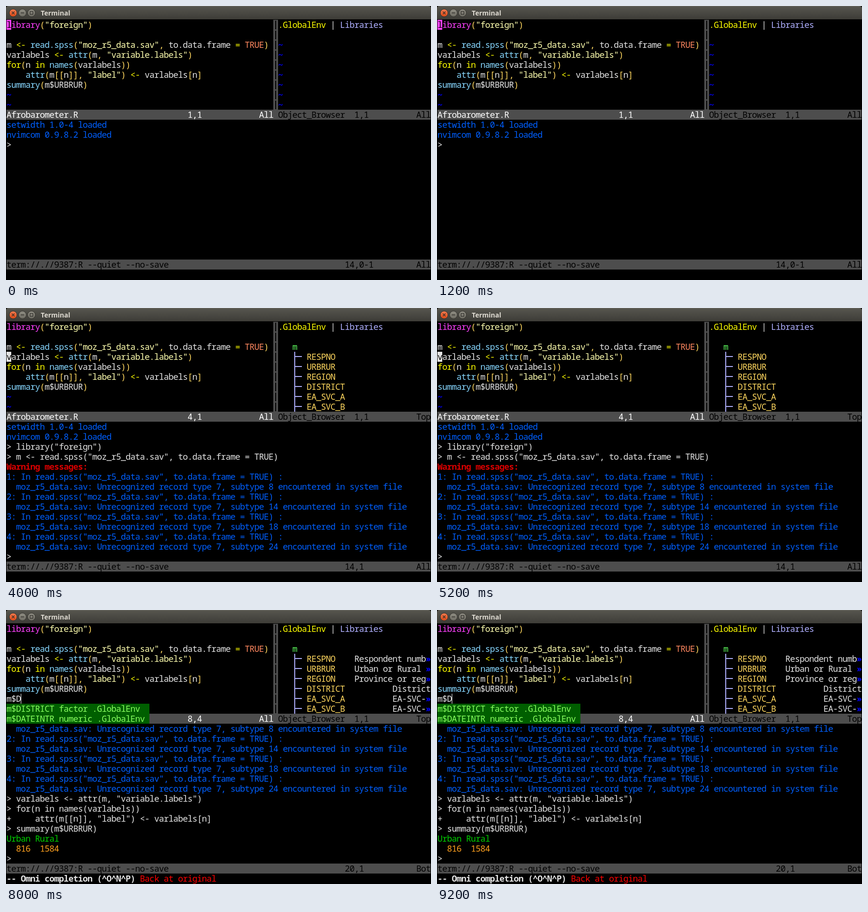
Animation of 892x576 px, one loop 10000 ms. Source, as an HTML page:

```html
<!DOCTYPE html>
<html lang="en">
<head>
<meta charset="utf-8">
<title>Terminal</title>
<style>
  html, body { margin: 0; width: 100%; height: 100%; overflow: hidden; background: #000; }
  #stage { position: absolute; left: 0; top: 0; width: 892px; height: 576px; overflow: hidden; background: #000; }
  #bar { position: absolute; left: 0; top: 0; }
  #bar text { font: bold 14px "Open Sans", "Noto Sans", sans-serif; fill: #dfdbd2; }
  #grid span, #probe {
    position: absolute; white-space: pre; height: 21px; line-height: 21px;
    font: 18px/21px "Noto Sans Mono", "DejaVu Sans Mono", monospace;
    font-variant-ligatures: none; font-kerning: none; color: #e4e4e4;
  }
  #probe { visibility: hidden; }
  #grid i { position: absolute; }
  #grid .magenta { color: #ff40ff; }
  #grid .string { color: #ffffaf; }
  #grid .gold { color: #ffd75f; }
  #grid .yellow { color: #ffff00; }
  #grid .func { color: #87d7ff; }
  #grid .const { color: #ff875f; }
  #grid .blue { color: #0000ff; }
  #grid .msg { color: #005fff; }
  #grid .warn { color: #d70000; font-weight: bold; }
  #grid .lilac { color: #afafff; }
  #grid .leaf { color: #5fff5f; }
  #grid .green { color: #00cd00; }
  #grid .orange { color: #ffa01e; }
  #grid .red { color: #ff0000; }
  #grid .bold { font-weight: bold; }
  #grid .white { color: #fff; }
  #grid .black { color: #000; }
  #grid .menu { color: #87ff5f; }
</style>
</head>
<body>
<div id="stage">
  <svg id="bar" width="892" height="28">
    <defs>
      <linearGradient id="metal" x2="0" y2="1">
        <stop offset="0" stop-color="#57564f"/><stop offset="1" stop-color="#3d3c37"/>
      </linearGradient>
      <linearGradient id="ember" x2="0" y2="1">
        <stop offset="0" stop-color="#f47c50"/><stop offset="1" stop-color="#dd4814"/>
      </linearGradient>
      <linearGradient id="stone" x2="0" y2="1">
        <stop offset="0" stop-color="#8f8d83"/><stop offset="1" stop-color="#6d6b62"/>
      </linearGradient>
    </defs>
    <path d="M0 28V5Q0 0 5 0H887Q892 0 892 5V28Z" fill="url(#metal)"/>
    <path d="M5 .5H887" stroke="#66655d"/>
    <g stroke="#302f2b">
      <circle cx="15" cy="14.5" r="8" fill="url(#ember)"/>
      <circle cx="34.5" cy="14.5" r="8" fill="url(#stone)"/>
      <circle cx="53.5" cy="14.5" r="8" fill="url(#stone)"/>
      <path d="M12.2 11.7l5.6 5.6m0-5.6l-5.6 5.6M31 14.5h7" stroke-width="1.4"/>
      <rect x="50.5" y="11.5" width="6" height="6" fill="none" stroke-width="1.2"/>
    </g>
    <text x="73" y="20">Terminal</text>
  </svg>
  <div id="grid"></div>
</div>
<script>
const COL = 10, ROW = 21, LEFT = 1, TOP = 29, HOLD = 2000;
const GRAY = '#4d4d4d', LILAC = '#afafff';
const grid = document.getElementById('grid');

const script = [
  'library("foreign")',
  '',
  'm <- read.spss("moz_r5_data.sav", to.data.frame = TRUE)',
  'varlabels <- attr(m, "variable.labels")',
  'for(n in names(varlabels))',
  '    attr(m[[n]], "label") <- varlabels[n]',
  'summary(m$URBRUR)'
];

const warnings = [8, 14, 18, 24].flatMap((subtype, i) => [
  [`${i + 1}: In read.spss("moz_r5_data.sav", to.data.frame = TRUE) :`, 'msg'],
  [`  moz_r5_data.sav: Unrecognized record type 7, subtype ${subtype} encountered in system file`, 'msg']
]);

const output = [
  ['setwidth 1.0-4 loaded', 'msg'],
  ['nvimcom 0.9.8.2 loaded', 'msg'],
  ['> ' + script[0]],
  ['> ' + script[2]],
  ['Warning messages:', 'warn'],
  ...warnings,
  ['> ' + script[3]],
  ['> ' + script[4]],
  ['+ ' + script[5]],
  ['> ' + script[6]],
  ['Urban Rural', 'green'],
  ['  816  1584', 'orange']
];

const columns = [
  ['RESPNO', 'Respondent numb»'],
  ['URBRUR', 'Urban or Rural »'],
  ['REGION', 'Province or reg»'],
  ['DISTRICT', 'District'],
  ['EA_SVC_A', 'EA-SVC-»'],
  ['EA_SVC_B', 'EA-SVC-»']
];

// printed: console lines above the prompt
const steps = [
  { line: 1, cursor: '#ff40ff', printed: 2, at: '14,0-1', scroll: 'All' },
  { line: 3, cursor: '#e4e4e4', printed: 3, at: '14,0-1', scroll: 'All' },
  { line: 4, cursor: '#e4e4e4', printed: 13, at: '14,1', scroll: 'All', tree: true },
  { line: 7, cursor: '#87d7ff', printed: 16, at: '17,1', scroll: 'Bot', tree: true, labels: true },
  { line: 8, typing: true, printed: 19, at: '20,1', scroll: 'Bot', tree: true, labels: true }
];

const syntax = [
  ['string', /^"[^"]*"/],
  ['yellow', /^(<-|=|(for|in)\b)/],
  ['magenta', /^library\b/],
  ['func', /^(read\.spss|attr|names|summary)(?=\()/],
  ['const', /^TRUE\b/],
  ['gold', /^[()[\],]/],
  ['', /^([\w.$]+|\s+)/]
];

const probe = document.createElement('span');
probe.id = 'probe';
probe.textContent = 'm'.repeat(100);
document.body.append(probe);
grid.style.letterSpacing = COL - probe.getBoundingClientRect().width / 100 + 'px';
probe.remove();

const rowTop = row => TOP + row * ROW;

function put(row, col, text, cls = '') {
  const el = document.createElement('span');
  el.className = cls;
  el.textContent = text;
  el.style.left = LEFT + col * COL + 'px';
  el.style.top = rowTop(row) + 'px';
  grid.append(el);
}

function box(x, y, w, h, color) {
  const el = document.createElement('i');
  el.style.cssText = `left:${x}px;top:${y}px;width:${w}px;height:${h}px;background:${color}`;
  grid.append(el);
}

const fill = (row, col, cols, color, rows = 1) =>
  box(LEFT + col * COL, rowTop(row), cols * COL, rows * ROW, color);

function putCode(row, text) {
  let col = 0;
  while (col < text.length) {
    const rest = text.slice(col);
    const [cls, rule] = syntax.find(([, re]) => re.test(rest));
    const token = rest.match(rule)[0];
    if (token.trim()) put(row, col, token, cls);
    col += token.length;
  }
}

function drawEditor(step) {
  script.forEach((text, row) => putCode(row, text));
  if (step.typing) {
    put(7, 0, 'm$D');
    box(31, rowTop(7), 1, ROW, '#fff');
  } else {
    const row = step.line - 1;
    put(7, 0, '~', 'blue bold');
    fill(row, 0, 1, step.cursor);
    put(row, 0, script[row][0], 'black');
  }
  put(8, 0, '~', 'blue bold');
}

function drawBrowser(step) {
  fill(0, 56, 1, GRAY, 9);
  for (let row = 0; row < 9; row++) box(565, rowTop(row) + 2, 2, 18, '#000');
  put(0, 57, '.GlobalEnv', 'yellow');
  put(0, 68, '|');
  put(0, 70, 'Libraries', 'lilac');
  if (!step.tree) {
    for (let row = 2; row < 9; row++) put(row, 57, '~', 'blue bold');
    return;
  }
  put(2, 60, 'm', 'leaf');
  box(605, rowTop(3), 2, 6 * ROW, LILAC);
  columns.forEach(([name, label], i) => {
    const row = i + 3;
    box(605, rowTop(row) + 9, 16, 2, LILAC);
    put(row, 63, name, 'gold');
    if (!step.labels) return;
    put(row, 89 - label.length, label.replace('»', ''));
    if (label.endsWith('»')) put(row, 88, '»', 'blue bold');
  });
}

function drawStatus(step) {
  fill(9, 0, 89, GRAY);
  put(9, 0, 'Afrobarometer.R', 'white');
  put(9, 38, step.line + (step.typing ? ',4' : ',1'), 'white');
  put(9, 53, 'All', 'white');
  put(9, 57, 'Object_Browser', 'black');
  put(9, 73, '1,1', 'black');
  put(9, 86, step.tree ? 'Top' : 'All', 'black');
  fill(24, 0, 89, GRAY);
  put(24, 0, 'term://.//9387:R --quiet --no-save', 'black');
  put(24, 71, step.at, 'black');
  put(24, 86, step.scroll, 'black');
}

function drawConsole(step) {
  const lines = [...output.slice(0, step.printed), ['>']];
  lines.slice(-14).forEach(([text, cls], i) => put(10 + i, 0, text, cls));
}

function drawCompletion() {
  fill(8, 0, 30, '#005f00', 2);
  put(8, 0, 'm$DISTRICT factor .GlobalEnv', 'menu');
  put(9, 0, 'm$DATEINTR numeric .GlobalEnv', 'menu');
  put(25, 0, '-- Omni completion (^O^N^P)', 'bold');
  put(25, 28, 'Back at original', 'red');
}

let shown = -1;
function tick() {
  const index = Math.floor(performance.now() / HOLD) % steps.length;
  if (index !== shown) {
    shown = index;
    const step = steps[index];
    grid.replaceChildren();
    drawEditor(step);
    drawBrowser(step);
    drawStatus(step);
    drawConsole(step);
    if (step.typing) drawCompletion();
  }
  requestAnimationFrame(tick);
}
tick();
</script>
</body>
</html>
```
